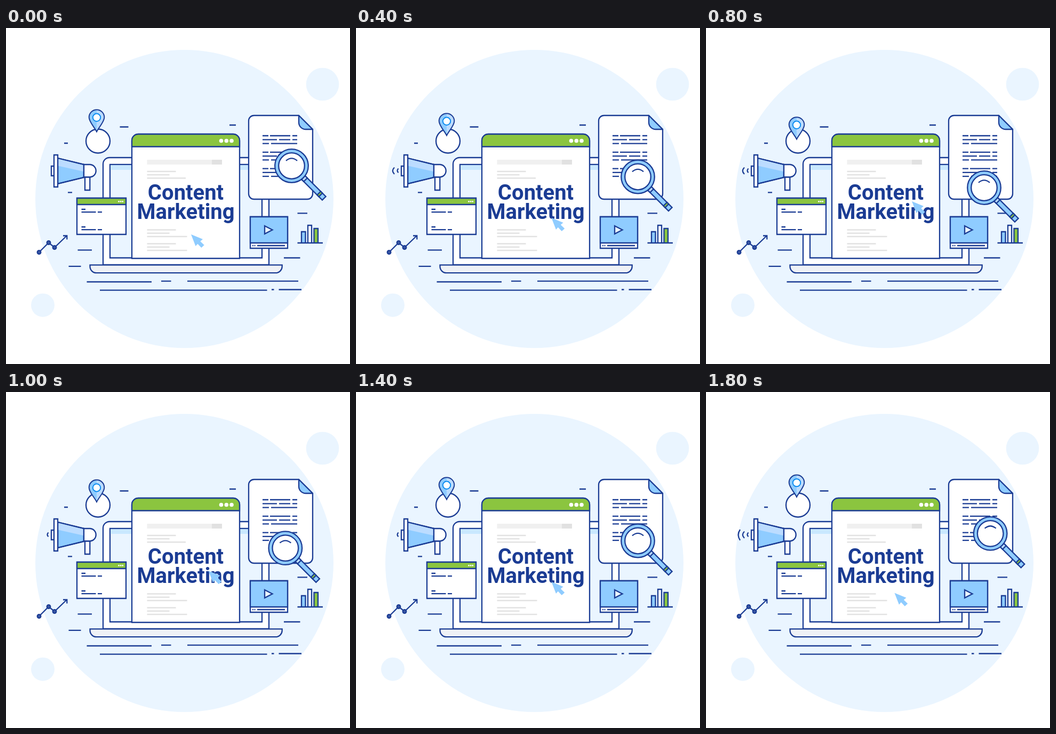
Recreate the animation shown at these times as an HTML page. Size 645 px wide and 630 px high, loop 2 s.

```html
<!DOCTYPE html>
<html lang="en">
<head>
<meta charset="utf-8">
<title>Content Marketing</title>
<style>
  html, body { margin: 0; width: 100%; height: 100%; overflow: hidden; background: #fff; }
  svg { display: block; width: 645px; height: 630px; }
  .ink { stroke: #1b3c94; stroke-width: 2.3; fill: none; }
  .white { fill: #fff; }
  .pale { fill: #eaf5ff; }
  .blue { fill: #8fccff; }
  .light { fill: #bcdcff; }
  .green { fill: #8bc53f; }
  .plain { stroke: none; }
  .gray { stroke: #e2e2e2; stroke-width: 2.5; }
  text { font: 700 40px Roboto, sans-serif; fill: #1b3c94; text-anchor: middle; }
</style>
</head>
<body>
<svg viewBox="0 0 645 630">
  <g class="pale">
    <circle cx="334.5" cy="320.5" r="279.5"/>
    <circle cx="593.5" cy="105.5" r="30.8"/>
    <circle cx="69" cy="519.7" r="22"/>
  </g>

  <path id="dashes" class="ink"/>

  <g id="laptop" class="ink">
    <path class="white" d="M182 444V255a12 12 0 0 1 12-12H481a12 12 0 0 1 12 12V444Z"/>
    <path class="pale" d="M195 256H480V431H195Z"/>
    <path class="plain" fill="#c9e8ff" d="M196 257H479V266H196Z"/>
    <path fill="#eef1f6" d="M157.500 444.300H517.700V447a12 12 0 0 1-12 12.200H169.500a12 12 0 0 1-12-12.200Z"/>
  </g>

  <g id="page" class="ink">
    <path class="white" d="M236 432V211a12 12 0 0 1 12-12H426a12 12 0 0 1 12 12V432Z"/>
    <path class="green" d="M236 222.500V211a12 12 0 0 1 12-12H426a12 12 0 0 1 12 12V222.500Z"/>
    <g class="white plain">
      <circle cx="403.500" cy="211.500" r="3.800"/>
      <circle cx="413.300" cy="211.500" r="3.800"/>
      <circle cx="423" cy="211.500" r="3.800"/>
    </g>
    <path class="plain" fill="#f0f0f0" d="M264.500 247H386V256H264.500Z"/>
    <path class="plain" fill="#e1e1e1" d="M386 247H405V256H386Z"/>
    <path id="copy" class="gray"/>
  </g>
  <text x="337" y="322">Content</text>
  <text x="337" y="358">Marketing</text>

  <g id="megaphone" class="ink">
    <path class="white" d="M85 259H90V277H85ZM148 279.500H157.300V304H148Z"/>
    <path class="blue" d="M97 244L146 256V280L97 292Z"/>
    <path class="light plain" d="M98 245.300L145 257V269L98 258.500Z"/>
    <path d="M97 244L146 256V280L97 292Z"/>
    <path class="white" d="M146 256H158a11.800 11.800 0 0 1 0 23.500H146Z"/>
    <path class="white" d="M90 238H97V298H90Z"/>
  </g>
  <g id="waves" class="ink">
    <path d="M79.500 263.500Q75.500 267.500 79.500 271.200"/>
    <path d="M72 261.500Q65.500 267.700 72 274"/>
    <path d="M64 258Q57 267.800 64 278"/>
  </g>

  <g class="ink">
    <path class="white" d="M133 319H225V387H133Z"/>
    <path class="green" d="M133 319H225V331H133Z"/>
    <path class="plain white" d="M210.200 324h2.600v2.600h-2.600zm3.600 0h2.600v2.600h-2.600zm3.600 0h2.600v2.600h-2.600z"/>
    <path id="rows"/>
  </g>

  <g class="ink">
    <path d="M62 420.500L80 402.500L91 411.500L114 389.500M107 389.500H114.300V396.500"/>
    <g fill="#3d59a4">
      <circle cx="62" cy="420.500" r="3.300"/>
      <circle cx="80" cy="402.500" r="3.300"/>
      <circle cx="91" cy="411.500" r="3.300"/>
    </g>
  </g>

  <g class="ink">
    <circle class="white" cx="172.500" cy="212" r="22.500"/>
    <g id="pin">
      <path class="blue plain" d="M170 153V194.500C166 186 155.700 176 155.700 167.500A14.300 14.300 0 0 1 170 153Z"/>
      <path class="light plain" d="M170 153V194.500C174 186 184.300 176 184.300 167.500A14.300 14.300 0 0 0 170 153Z"/>
      <path stroke-width="2" d="M170 194.500C166 186 155.700 176 155.700 167.500A14.300 14.300 0 0 1 184.300 167.500C184.300 176 174 186 170 194.500Z"/>
      <circle class="white" cx="170" cy="167.800" r="7.200" style="stroke:#0c8df0;stroke-width:2"/>
    </g>
  </g>

  <g class="ink">
    <path class="white" d="M549 164L575 190V311a10 10 0 0 1-10 10H465a10 10 0 0 1-10-10V174a10 10 0 0 1 10-10Z"/>
    <path class="blue" stroke-linejoin="round" d="M549 164V177a13 13 0 0 0 13 13H575Z"/>
    <path id="lines"/>
  </g>

  <g class="ink">
    <path class="white" d="M458 354H528V413H458Z"/>
    <path class="blue" d="M458 354H528V403H458Z"/>
    <path class="pale" d="M485 371L499.500 378.500L485 386Z"/>
    <path d="M462 408h2m1.500 0h2M471 408H523"/>
  </g>

  <g class="ink">
    <path class="blue" d="M554 403V382H561.500V403"/>
    <path class="white" d="M566 403V370H573V403"/>
    <path class="green" d="M577.500 403V376H585V403"/>
    <path d="M546.500 403H594"/>
  </g>

  <g id="lens" class="ink">
    <g transform="translate(535.500 258.500) rotate(45)">
      <path class="blue" d="M31 -4.700H86V4.700H31Z"/>
      <path class="light" d="M31 -4.700H37V4.700H31Z"/>
      <path class="green" d="M72.500 -4.700H77V4.700H72.500Z"/>
    </g>
    <circle class="blue" cx="535.500" cy="258.500" r="31.300"/>
    <circle class="white" cx="535.500" cy="258.500" r="24.300"/>
    <path d="M525 248.800Q535.500 240 546 248.800"/>
  </g>

  <path id="cursor" class="blue" d="M347 387L369 396L364.300 400L371.700 407L366.300 412L359.300 404.700L355.500 409Z"/>
</svg>
<script>
  const $ = id => document.getElementById(id);
  const dash = (y, ...xs) => {
    let d = '';
    for (let i = 0; i < xs.length; i += 2) d += `M${xs[i]} ${y}H${xs[i + 1]}`;
    return d;
  };
  const draw = (id, ...parts) => $(id).setAttribute('d', parts.join(''));

  draw('dashes',
    dash(182, 419, 431), dash(185.5, 213.5, 229.5), dash(216, 109, 116),
    dash(308.3, 116, 124), dash(347.4, 546.5, 565), dash(416.3, 134.5, 161),
    dash(431, 521, 551.5), dash(446.8, 117.5, 140.5),
    dash(474.7, 291, 309.5, 340, 548), dash(476, 151.5, 273),
    dash(490.5, 498, 502.5, 511.5, 554), dash(491.7, 176, 489.5));
  draw('copy',
    dash(269, 264.5, 318.5), dash(275.3, 264.5, 306.5), dash(281.6, 264.5, 337),
    ...[378.6, 404.5].map(y =>
      dash(y, 264.5, 318.5) + dash(y + 6.2, 264.5, 306.5) + dash(y + 12.5, 264.5, 339.5)));
  draw('rows', ...[340, 373].map(y =>
    dash(y, 141.5, 149) + dash(y + 5.2, 141.5, 168.5, 172, 180)));
  draw('lines', ...[202, 232.8, 263.6].map(y =>
    dash(y, 481, 492, 495, 533, 537, 546) +
    dash(y + 7.3, 481, 508, 512, 533, 537, 546) +
    dash(y + 14.6, 481, 493, 497, 546)));

  const STEP = 200, STEPS = 10, PEAK = 4;
  const travel = { pin: [0, 14], lens: [-14, 41], cursor: [39, -62] };
  const loud = [0, 1, 2, 3, 2, 1, 0, 1, 2, 3];
  const waves = [...$('waves').children];
  const start = performance.now();

  function render(ms) {
    const k = Math.floor(Math.max(0, ms) / STEP) % STEPS;
    const p = k <= PEAK ? k / PEAK : (STEPS - k) / (STEPS - PEAK);
    for (const [id, [x, y]] of Object.entries(travel))
      $(id).setAttribute('transform', `translate(${x * p} ${y * p})`);
    waves.forEach((w, i) => w.style.display = i < loud[k] ? '' : 'none');
  }
  function tick() {
    render(performance.now() - start);
    requestAnimationFrame(tick);
  }
  tick();
</script>
</body>
</html>
```
